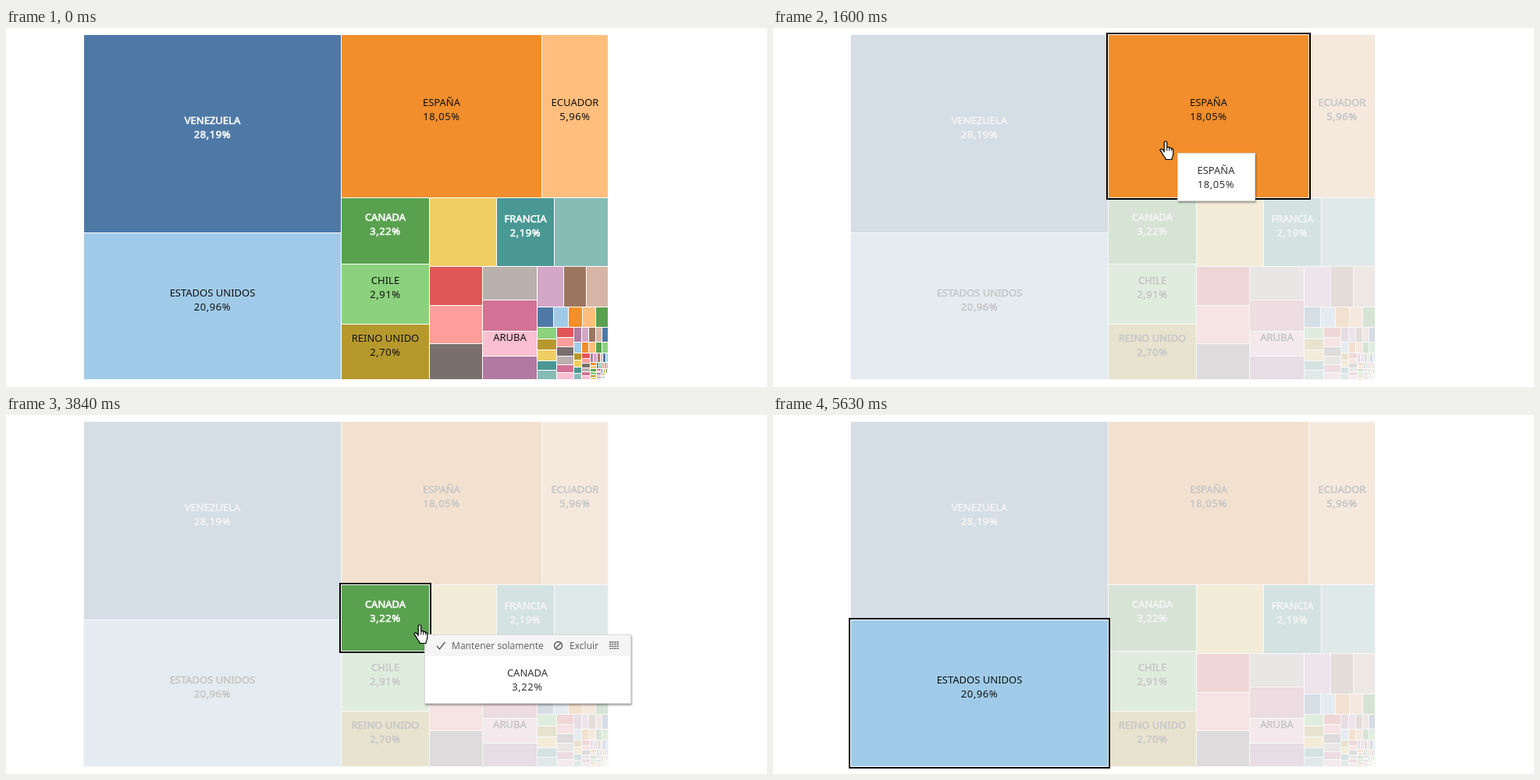
Write an HTML page that moves like this. It is 975 by 460 pixels and loops after 6.02 s.

```html
<!DOCTYPE html>
<html lang="es">
<head>
<meta charset="utf-8">
<title>Treemap</title>
<style>
html, body { margin: 0; width: 100%; height: 100%; overflow: hidden; background: #fff; }
svg { display: block; width: 975px; height: 460px; font: 13px "Noto Sans", sans-serif; }
text { text-anchor: middle; fill: #111; }
.pct { letter-spacing: .55px; }
.tile rect { fill: var(--c); stroke: #fff; }
.tile .light { fill: #fff; stroke: #fff; stroke-width: .6px; }
.dim rect { fill: color-mix(in srgb, var(--c) 18%, #f3f3f3); stroke: #f8f8f8; }
.dim text { fill: #c8c8c8; stroke: #c8c8c8; stroke-width: .6px; }
.dim .light { fill: #f3f3f3; stroke: #f3f3f3; }
.outline { fill: none; stroke: #000; }
#tip { filter: drop-shadow(1px 2px 1px rgba(0, 0, 0, .35)); }
#panel { fill: #fff; stroke: #d8d8d8; }
#tip > text { fill: #333; }
#bar text { font-size: 12px; fill: #666; text-anchor: start; }
#bar path, #bar circle { fill: none; stroke: #555; stroke-width: 1.3; }
</style>
</head>
<body>
<svg viewBox="0 0 975 460">
  <g id="map"></g>
  <g id="outlines"></g>
  <circle id="glow" r="12" fill="#f2ee28" opacity=".85"/>
  <g id="tip">
    <rect id="panel" x=".5" y=".5"/>
    <g id="bar">
      <rect x="1" y="1" width="263" height="27" fill="#f5f5f5"/>
      <path d="M16 15l3.5 4 7-9"/>
      <text x="35" y="19">Mantener solamente</text>
      <circle cx="171.5" cy="14.5" r="5"/>
      <path d="M168 18l7-7"/>
      <text x="186" y="19">Excluir</text>
      <path d="M237 10h12m-12 2.7h12m-12 2.7h12m-12 2.7h12" stroke-dasharray="2.4 .8"/>
    </g>
    <text id="tipName"></text>
    <text id="tipPct" class="pct"></text>
  </g>
  <g id="hand" stroke="#000" stroke-linejoin="round">
    <path fill="#fff" stroke-width="1.2" d="M-1.8 14V1.8a1.8 1.8 0 0 1 3.6 0V8q2.6-1 3 .8 2.4-.8 2.8 1 2.2-.5 2.2 2V16q0 3-1.6 5v2.5H0V22q-3-3-4.2-6.2-1.2-2.4-2.6-3.6-.6-1.6 1-2 2-.2 4 3z"/>
    <path fill="none" d="M1.8 8v4.5m3-3.5v3.5m2.8-2.5v2.5"/>
  </g>
</svg>
<script>
const LOOP = 6020, STEP = 77;
const PALETTE = ('4e79a7 a0cbe8 f28e2b ffbe7d 59a14f 8cd17d b6992d f1ce63 499894 86bcb6 ' +
  'e15759 ff9d9a 79706e bab0ac d37295 fabfd2 b07aa1 d4a6c8 9d7660 d7b5a6').split(' ');
const NAMES = { 0: 'VENEZUELA', 1: 'ESTADOS UNIDOS', 2: 'ESPAÑA', 3: 'ECUADOR', 4: 'CANADA',
  5: 'CHILE', 6: 'REINO UNIDO', 8: 'FRANCIA', 15: 'ARUBA' };
const VENEZUELA = 0, USA = 1, SPAIN = 2, CANADA = 4, FRANCE = 8, ARUBA = 15;
const LIGHT = [VENEZUELA, CANADA, FRANCE];

// Shares in percent: the large ones, then a geometric tail
const shares = [
  28.19, 20.96, 18.05, 5.96, 3.22, 2.91, 2.7, 2.55, 2.19, 2.04,
  1.15, 1.12, 1.05, 1.02, .94, .75, .71, .595, .508, .49,
  ...Array.from({ length: 80 }, (_, k) => .181 * .937 ** k)
];
// How many tiles go into each column (c) or row (r); later strips alternate
const strips = 'c2 r2 c3 r3 c3 c4 r3 r5 c5 c6 r5 r5 c4 c6 r6'.split(' ');

const $ = id => document.getElementById(id);
const sum = list => list.reduce((a, b) => a + b, 0);
const show = (node, on) => { node.style.display = on ? '' : 'none'; };
const moveTo = (node, x, y) => set(node, { transform: `translate(${x} ${y})` });
function set(node, attrs) {
  for (const key in attrs) node.setAttribute(key, attrs[key]);
}
function add(parent, tag, attrs, text = '') {
  const node = document.createElementNS('http://www.w3.org/2000/svg', tag);
  set(node, attrs);
  node.textContent = text;
  return parent.appendChild(node);
}

const tiles = [];
function addTile(x0, y0, x1, y1) {
  const i = tiles.length, name = NAMES[i];
  const pct = i === ARUBA ? '' : shares[i].toFixed(2).replace('.', ',') + '%';
  const node = add($('map'), 'g', { class: 'tile', style: `--c:#${PALETTE[i % 20]}` });
  add(node, 'rect', { x: x0, y: y0, width: x1 - x0, height: y1 - y0 });
  if (name) {
    const tone = LIGHT.includes(i) ? 'light' : '';
    const x = (x0 + x1) / 2, y = Math.round((y0 + y1) / 2) - (pct ? 13 : 4);
    add(node, 'text', { x, y, class: tone }, name);
    add(node, 'text', { x, y: y + 18, class: tone + ' pct' }, pct);
  }
  tiles.push({ node, name, pct, x0, y0, x1, y1 });
}

function layOut(x0, y0, x1, y1) {
  for (let n = 0; tiles.length < shares.length; n++) {
    const [kind, count] = strips[n] ?? (n % 2 ? 'c6' : 'r6').replace(/^./, n % 2 ? 'c' : 'r');
    const first = tiles.length;
    const group = shares.slice(first, first + Number(count));
    const total = sum(group), part = total / sum(shares.slice(first));
    const column = kind === 'c';
    const x = x0 + Math.round((x1 - x0) * part), y = y0 + Math.round((y1 - y0) * part);
    const cut = (a, b, k) => a + Math.round((b - a) * sum(group.slice(0, k)) / total);
    group.forEach((_, k) => column
      ? addTile(x0, cut(y0, y1, k), x, cut(y0, y1, k + 1))
      : addTile(cut(x0, x1, k), y0, cut(x0, x1, k + 1), y));
    if (column) x0 = x; else y0 = y;
  }
}
layOut(99.5, 8.5, 771.5, 450.5);

// Each scene moves the pointer from the last resting point to `at`, bending towards `via`
const scenes = [
  { from: 0, to: 0, at: [824, 446] },
  { from: 130, to: 670, at: [342, 226], hover: true },
  { from: 740, to: 1280, at: [492, 150], via: [251, 179], hover: true },
  { from: 1360, to: 1600, at: [503, 145], pick: SPAIN },
  { from: 1830, to: 2370, at: [491, 253], hover: true },
  { from: 2450, to: 2680, at: [491, 262], via: [550, 257], hover: true },
  { from: 2830, to: 2910, at: [491, 262], pick: CANADA },
  { from: 3060, to: 3290, at: [543, 263] },
  { from: 3520, to: 3520, at: [542, 264] },
  { from: 3840, to: 4220, at: [384, 330], hover: true },
  { from: 4390, to: 4450, at: [384, 330], pick: USA },
  { from: 4620, to: 5160, at: [544, 341], via: [440, 310] },
  { from: 5240, to: 5630, at: [902, 452] }
];
// Tooltips follow the pointer unless x and y pin them
const tips = [
  { from: 890, to: 1130, of: VENEZUELA, w: 99, x: 383, y: 188 },
  { from: 1200, to: 2180, of: SPAIN, w: 99 },
  { from: 2180, to: 3200, of: CANADA, w: 77 },
  { from: 3200, to: 3900, of: CANADA, w: 264, x: 536, y: 281, full: true },
  { from: 4210, to: 4740, of: USA, w: 134 },
  { from: 5000, to: 5470, of: USA, w: 264, x: 536, y: 354, full: true }
];

const newOutline = width => add($('outlines'), 'rect', { class: 'outline', 'stroke-width': width });
const hoverBox = newOutline(1), chosenBox = newOutline(2), pickBox = newOutline(2);

function frame(box, tile, gap) {
  show(box, tile);
  if (tile) set(box, {
    x: tile.x0 - gap, y: tile.y0 - gap,
    width: tile.x1 - tile.x0 + 2 * gap, height: tile.y1 - tile.y0 + 2 * gap
  });
}

function pointerAt(index, k) {
  const { at, via } = scenes[index], start = scenes[Math.max(index - 1, 0)].at;
  const s = k * k * (3 - 2 * k);
  return at.map((end, axis) => {
    const mid = via ? via[axis] : (start[axis] + end) / 2;
    return Math.round((1 - s) ** 2 * start[axis] + 2 * s * (1 - s) * mid + s * s * end);
  });
}

function drawTip(tip, px, py) {
  show($('tip'), tip);
  if (!tip) return;
  const { of, w, full, x = px + 15, y = py + 15 } = tip;
  const baseline = full ? 54 : 27;
  moveTo($('tip'), x, y);
  show($('bar'), full);
  set($('panel'), { width: w, height: full ? 88 : 61 });
  set($('tipName'), { x: w / 2, y: baseline });
  set($('tipPct'), { x: w / 2, y: baseline + 18 });
  $('tipName').textContent = tiles[of].name;
  $('tipPct').textContent = tiles[of].pct;
}

function draw(now) {
  const index = scenes.findLastIndex(scene => scene.from <= now);
  const { from, to, hover, pick } = scenes[index];
  const last = Math.round((to - from) / STEP);
  const step = last ? Math.min(last, Math.floor((now - from) / (to - from) * last + .01)) : 0;
  const t = from + (last ? (to - from) * step / last : 0);
  const [x, y] = pointerAt(index, (step + 1) / (last + 1));

  show($('hand'), t >= 130 && t < 5630);
  moveTo($('hand'), x, y);

  const pressing = pick !== undefined && step === 0;
  show($('glow'), pressing);
  moveTo($('glow'), x, y);

  const past = scenes.slice(0, pressing ? index : index + 1);
  const chosen = past.findLast(scene => scene.pick !== undefined)?.pick;
  tiles.forEach(({ node }, i) => node.classList.toggle('dim', chosen !== undefined && i !== chosen));
  frame(chosenBox, tiles[chosen], 1.5);
  frame(pickBox, pressing && tiles[pick], 1.5);

  const under = hover && tiles.find(r => x > r.x0 && x < r.x1 && y > r.y0 && y < r.y1);
  frame(hoverBox, under !== tiles[chosen] && under, 1);

  drawTip(tips.find(tip => t >= tip.from && t < tip.to), x, y);
}

const start = performance.now();
function tick() {
  draw((performance.now() - start) % LOOP);
  requestAnimationFrame(tick);
}
tick();
</script>
</body>
</html>
```
